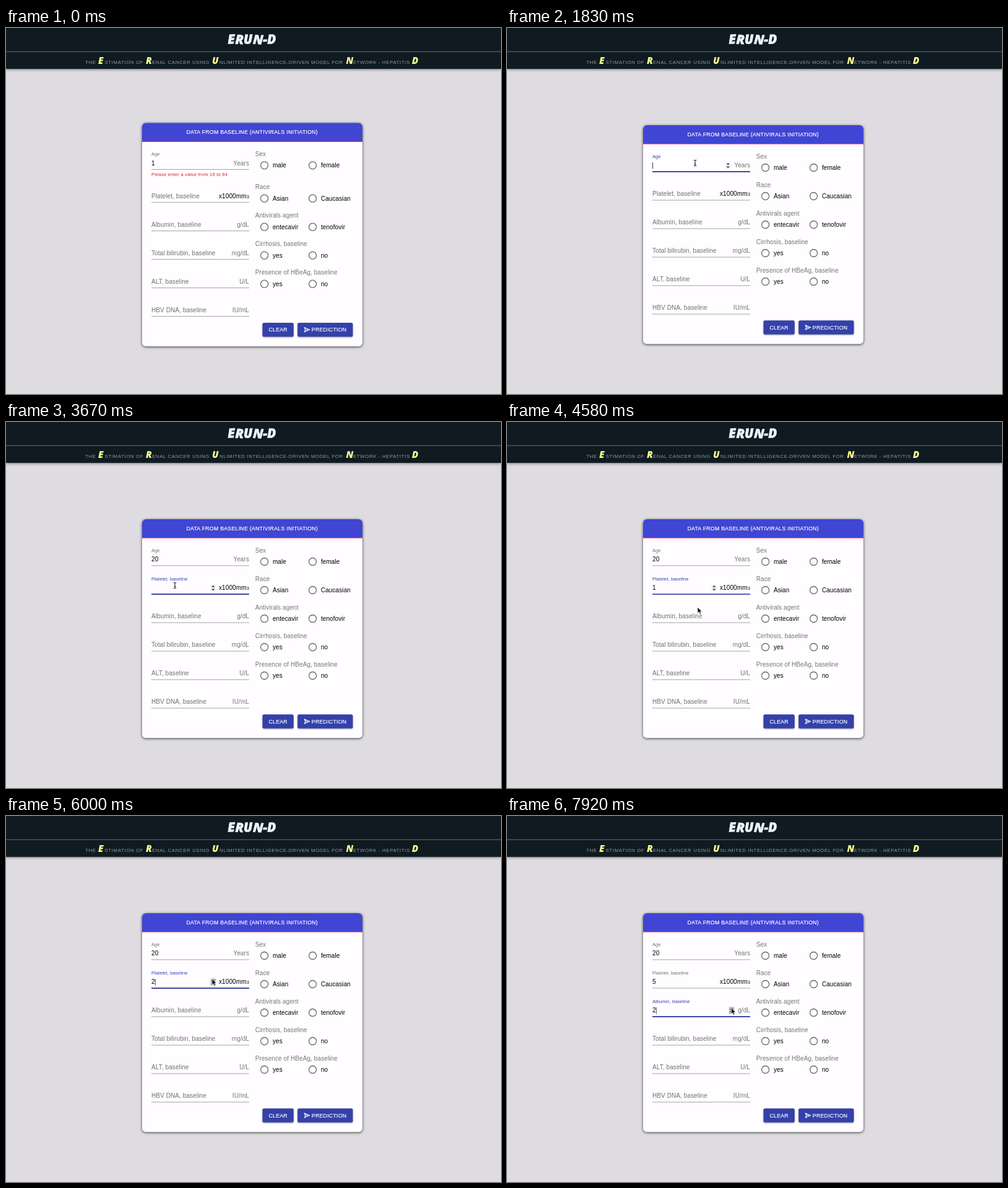
An HTML page that plays this animation: 800x591 px, repeating every 8000 ms.

```html
<!DOCTYPE html>
<html lang="en">
<head>
<meta charset="utf-8">
<title>Baseline form</title>
<style>
html, body { margin: 0; width: 100%; height: 100%; overflow: hidden; background: #dedce0; }
svg { display: block; width: 100vw; height: 100vh; }
text { font-family: "Liberation Sans", Arial, sans-serif; font-size: 10px; letter-spacing: .094px; white-space: pre; }
.marker { font-family: "Open Sans", "Noto Sans", sans-serif; font-weight: 800; font-style: italic; letter-spacing: 0; stroke-linejoin: round; }
.sub { font-size: 7.8px; letter-spacing: .65px; fill: #92999d; }
.caps { font-size: 8.77px; letter-spacing: .25px; fill: #fff; stroke: #fff; stroke-width: .18px; }
.grey { fill: #757575; }
.help { font-size: 7.5px; letter-spacing: .25px; fill: #d5221f; }
.radio { fill: none; stroke: #6b6b6b; stroke-width: 1.3; }
.btn { fill: #3441aa; filter: drop-shadow(0 1px 1px rgba(0,0,0,.4)); }
</style>
</head>
<body>
<svg id="stage" viewBox="0 0 800 591" preserveAspectRatio="none"></svg>
<script>
const NS = 'http://www.w3.org/2000/svg';
const stage = document.getElementById('stage');
const LOOP = 8000, STEP = LOOP / 96;
const LEFT = 235, RIGHT = 393, FIRST = 232, PITCH = 46, EXTRA = 7.4;

function add(parent, tag, attrs = {}, text) {
  const el = document.createElementNS(NS, tag);
  set(el, attrs);
  if (text !== undefined) el.textContent = text;
  parent.appendChild(el);
  return el;
}
function set(el, attrs) {
  for (const k in attrs) el.setAttribute(k, attrs[k]);
}
const label = (parent, x, y, text, cls = '', more = {}) =>
  add(parent, 'text', { x, y, class: cls, ...more }, text);
const box = (parent, x, y, width, height, fill, more = {}) =>
  add(parent, 'rect', { x, y, width, height, fill, ...more });
const show = (el, on) => el.setAttribute('visibility', on ? 'visible' : 'hidden');
const shift = (el, x, y, extra = '') => el.setAttribute('transform', `translate(${x} ${y})${extra}`);

// Page header
box(stage, 0, 0, 800, 591, '#dedce0');
box(stage, 0, 0, 800, 66, '#0f1b21', { style: 'filter:drop-shadow(0 1px 2px rgba(0,0,0,.5))' });
box(stage, 0, 37.7, 800, .9, '#6e777b');
label(stage, 397.5, 25.8, 'ERUN-D', 'marker', {
  'text-anchor': 'middle', style: 'font-size:21px', fill: '#eaf4f8', stroke: '#eaf4f8', 'stroke-width': .6, rotate: '-3 2 -2 3 0 -2'
});
[[128, '', 'THE'], [149, 'E', 'STIMATION OF', 159.5], [226, 'R', 'ENAL CANCER USING', 236],
 [333, 'U', 'NLIMITED INTELLIGENCE-DRIVEN MODEL FOR', 345], [549.5, 'N', 'ETWORK - HEPATITIS', 561], [656, 'D', '']]
  .forEach(([x, big, rest, restX = x]) => {
    label(stage, x, 58, big, 'marker', { style: 'font-size:15px', fill: '#ffff8d' });
    label(stage, restX, 58, rest, 'sub');
  });

// Card
const card = add(stage, 'g');
const panel = box(card, 220, 157, 356, 353.3, '#fffdff', {
  rx: 6, style: 'filter:drop-shadow(0 1px 2px rgba(0,0,0,.75))'
});
add(card, 'path', { d: 'M220 187V163a6 6 0 0 1 6-6H570a6 6 0 0 1 6 6V187Z', fill: '#4045d3' });
box(card, 220, 186.2, 356, 1.4, '#d81f64');
label(card, 397.7, 175.2, 'DATA FROM BASELINE (ANTIVIRALS INITIATION)', 'caps', { 'text-anchor': 'middle' });

const fields = [
  { name: 'Age', unit: 'Years', spin: 357.2, focus: [[960, 3150]],
    values: [[0, '1'], [1800, ''], [2080, '2'], [2250, '20']], presses: [] },
  { name: 'Platelet, baseline', unit: 'x1000mm', spin: 334.8, focus: [[3150, 4750], [5468, 7000]],
    values: [[3800, '1'], [5900, '2'], [6150, '3'], [6350, '4'], [6560, '5']], presses: [5900, 6150, 6350, 6560] },
  { name: 'Albumin, baseline', unit: 'g/dL', spin: 363, focus: [[4750, 5468], [7000, 9000]],
    values: [[7500, '1'], [7830, '2']], presses: [7500, 7830] },
  { name: 'Total bilirubin, baseline', unit: 'mg/dL', spin: 355 },
  { name: 'ALT, baseline', unit: 'U/L', spin: 367 },
  { name: 'HBV DNA, baseline', unit: 'IU/mL', spin: 356 }
];
const choices = [
  ['Sex', 'male', 'female'], ['Race', 'Asian', 'Caucasian'], ['Antivirals agent', 'entecavir', 'tenofovir'],
  ['Cirrhosis, baseline', 'yes', 'no'], ['Presence of HBeAg, baseline', 'yes', 'no']
];
const errors = [
  { row: 0, from: 0, to: 1800, text: 'Please enter a value from 19 to 94' },
  { row: 1, from: 4750, to: 5900, text: 'Please enter a value from 5 to 662' }
];

// Each row is drawn with its underline at y = 0
const rows = fields.map((f, i) => {
  const g = add(card, 'g');
  const row = { g, f };
  row.line = box(g, LEFT, -.4, RIGHT - LEFT, .8, '#8c8c8c');
  row.active = box(g, LEFT, -.7, 0, 1.5, '#3140b4');
  row.name = add(g, 'text', {}, f.name);
  row.value = label(g, LEFT, -6.6, '');
  row.caret = box(g, 0, -15, .8, 10.5, '#111');
  if (i === 1) {
    label(g, 344, -6.6, f.unit);
    label(g, 389, -7, '3', '', { style: 'font-size:7px' });
  } else {
    label(g, RIGHT, -6.6, f.unit, 'grey', { 'text-anchor': 'end' });
  }
  row.spin = add(g, 'g', { transform: `translate(${f.spin} -10)` });
  row.spinBox = box(row.spin, -4.2, -5.5, 8.4, 11, '#efefef');
  add(row.spin, 'path', { d: 'M-2.6 -1.4L0 -4.2L2.6 -1.4ZM-2.6 1.4L0 4.2L2.6 1.4Z', fill: '#3c3c3c' });
  if (choices[i]) {
    const [title, a, b] = choices[i];
    label(g, 402.7, -21.4, title, 'grey');
    [[417.6, a], [495.6, b]].forEach(([cx, text]) => {
      add(g, 'circle', { cx, cy: -6.5, r: 6, class: 'radio' });
      label(g, cx + 13.3, -3, text);
    });
  }
  return row;
});
const help = label(card, LEFT, 0, '', 'help');

const footer = add(card, 'g');
box(footer, 414.5, 472.2, 50.3, 22.6, '', { rx: 2.5, class: 'btn' });
box(footer, 471.2, 472.2, 89.3, 22.6, '', { rx: 2.5, class: 'btn' });
label(footer, 439.7, 486.6, 'CLEAR', 'caps', { 'text-anchor': 'middle' });
label(footer, 493.8, 486.6, 'PREDICTION', 'caps');
add(footer, 'path', {
  d: 'M482.4 480L490.6 483.5L482.4 487L483.9 483.5ZM483.9 483.5H487.5',
  fill: 'none', stroke: '#fff', 'stroke-width': 1.1
});

// Pointers
const arrow = add(stage, 'path', {
  d: 'M0 0V9.6L2.2 7.6L3.8 11.2L5.5 10.4L4 7H7Z',
  fill: '#000', stroke: '#fff', 'stroke-width': .7
});
const beam = add(stage, 'g');
['#fff', '#111'].forEach((stroke, i) => add(beam, 'path', {
  d: 'M-2.2 -4.8Q0 -4.8 0 -3.4Q0 -4.8 2.2 -4.8M0 -3.6V3.6M-2.2 4.8Q0 4.8 0 3.4Q0 4.8 2.2 4.8M-1.2 1.6H1.2',
  fill: 'none', stroke, 'stroke-width': i ? 1 : 2
}));
const path = [
  [150, 336, 528], [880, 304, 218], [2420, 304, 218], [2920, 273, 264], [3950, 273, 264],
  [4580, 308, 299], [4740, 312, 314], [4950, 314, 314], [5420, 324, 264], [5500, 324, 264],
  [5860, 333, 263], [6620, 333, 263], [6950, 338, 312], [7080, 338, 312], [7420, 362.5, 310], [8000, 362.5, 310]
];

function pointerAt(t) {
  const i = path.findIndex(p => p[0] >= t);
  if (i < 1) return null;
  const [t0, x0, y0] = path[i - 1], [t1, x1, y1] = path[i];
  const u = (t - t0) / (t1 - t0), k = u * u * (3 - 2 * u);
  return { x: x0 + (x1 - x0) * k, y: y0 + (y1 - y0) * k };
}

// cubic-bezier(0, 0, .2, 1)
function easeOut(u) {
  if (u <= 0) return 0;
  if (u >= 1) return 1;
  let lo = 0, hi = 1;
  for (let i = 0; i < 20; i++) {
    const s = (lo + hi) / 2;
    if (.6 * (1 - s) * s * s + s * s * s < u) lo = s; else hi = s;
  }
  return lo * lo * (3 - 2 * lo);
}
const mix = (a, b, k) => `rgb(${a.map((v, i) => Math.round(v + (b[i] - v) * k))})`;

function drawRow(row, y, t, p) {
  const { f } = row, focus = f.focus || [];
  const past = (f.values || []).filter(v => v[0] <= t);
  const [changed, value] = past.length ? past[past.length - 1] : [0, ''];
  const span = focus.find(([a, b]) => t >= a && t < b);
  const k = focus.reduce((m, [a, b]) => m + easeOut((t - a) / 200) - easeOut((t - b) / 200), 0);
  const over = p && p.x > LEFT && p.x < RIGHT && p.y > y - 24 && p.y < y + 1;
  const onSpin = over && Math.abs(p.x - f.spin) < 5;
  const small = value ? 1 : k;

  set(row.line, { fill: over ? '#161616' : '#8c8c8c', y: over ? -.6 : -.4, height: over ? 1.3 : .8 });
  set(row.active, { x: (LEFT + RIGHT - (RIGHT - LEFT) * k) / 2, width: (RIGHT - LEFT) * k });
  shift(row.name, LEFT, -6.6 - 15.8 * small, ` scale(${1 - .25 * small})`);
  row.name.setAttribute('fill', mix([112, 112, 112], [49, 64, 180], k));
  row.value.textContent = value;

  const since = span ? t - Math.max(span[0], changed) : 0;
  show(row.caret, span && since % 1000 < 500);
  row.caret.setAttribute('x', LEFT + .2 + value.length * 5.65);
  show(row.spin, span || over);
  const pressed = (f.presses || []).some(a => t >= a && t < a + 130);
  row.spinBox.setAttribute('fill', pressed ? '#b4b4b4' : '#efefef');
  return over && !onSpin;
}

function draw(t) {
  const error = errors.find(e => t >= e.from && t < e.to);
  const extra = error ? EXTRA : 0, dy = -extra / 2, p = pointerAt(t);
  shift(card, 0, dy);
  panel.setAttribute('height', 353.3 + extra);
  shift(footer, 0, extra);

  let typing = false;
  rows.forEach((row, i) => {
    const y = FIRST + PITCH * i + (error && i > error.row ? EXTRA : 0);
    shift(row.g, 0, y);
    if (drawRow(row, y + dy, t, p)) typing = true;
  });

  help.textContent = error ? error.text : '';
  if (error) help.setAttribute('y', FIRST + PITCH * error.row + 10.5);
  show(arrow, p && !typing);
  show(beam, p && typing);
  if (p) [arrow, beam].forEach(el => shift(el, p.x, p.y));
}

function tick() {
  const t = performance.now() % LOOP;
  draw(Math.floor((t + 5) / STEP) % 96 * STEP);
  requestAnimationFrame(tick);
}
tick();
</script>
</body>
</html>
```
